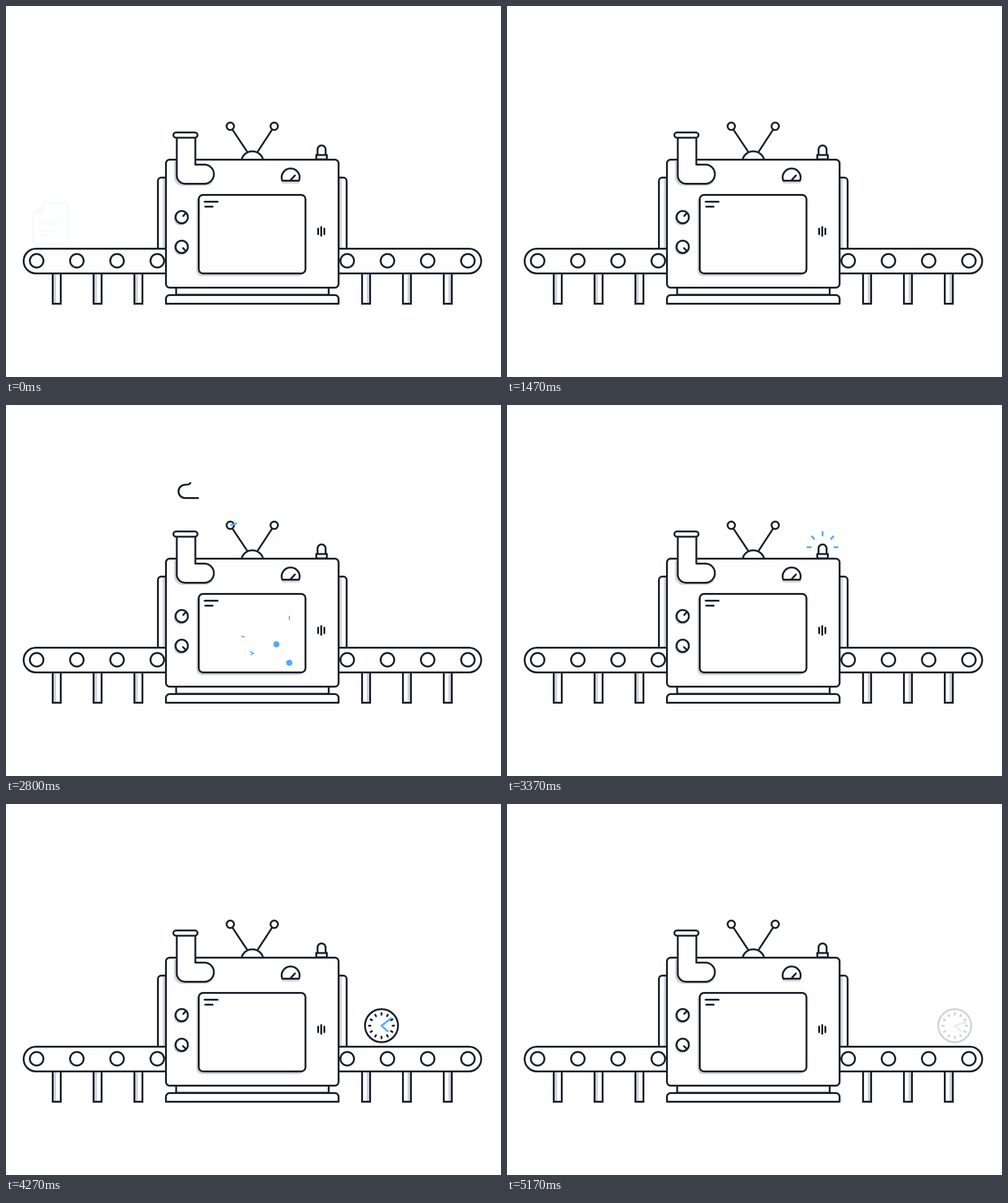
These frames come from a looping animation (800 by 600 pixels, 5.2 s). An HTML page:

```html
<!DOCTYPE html>
<html lang="en">
<head>
<meta charset="utf-8">
<title>Code machine</title>
<style>
html, body { margin: 0; width: 100%; height: 100%; overflow: hidden; background: #fff; }
svg { display: block; width: 800px; height: 600px; }
.ink { fill: #fff; stroke: #16222d; stroke-width: 3; stroke-linejoin: round; stroke-linecap: round; }
.line { fill: none; }
.shade { fill: #d2d3d7; }
.blue { fill: none; stroke: #54aaff; stroke-width: 3; stroke-linecap: round; stroke-linejoin: round; }
.solid { fill: #54aaff; stroke: none; }
#label { font: bold 14.5px "Open Sans", sans-serif; }
</style>
</head>
<body>
<svg viewBox="0 0 800 600">
  <g class="ink">
    <g id="legs"></g>
    <path d="M258 392.5H48.5a20 20 0 0 0 0 40H258"/>
    <path d="M538 392.5H748a20 20 0 0 1 0 40H538"/>
    <g id="rollers"></g>
  </g>

  <g id="doc" class="blue">
    <path fill="#fff" d="M-10 318.5H24.500a4 4 0 0 1 4 4V381a4 4 0 0 1-4 4H-24a4 4 0 0 1-4-4V336Z"/>
    <path class="solid" d="M-29 336.500L-10 317.500V332a4.500 4.500 0 0 1-4.500 4.500Z"/>
    <text id="label" class="solid" x="-18" y="357">!?#$*</text>
    <path d="M-13.500 364.500H9M-13.500 370.500H-2"/>
  </g>

  <g id="clock">
    <circle class="ink" cy="358.500" r="26.700"/>
    <path id="ticks" class="ink line"/>
    <path id="hands" class="blue"/>
  </g>

  <g class="ink">
    <path d="M258 277.500H251a5.500 5.500 0 0 0-5.500 5.500V392"/>
    <path d="M538 277.500H545a5.500 5.500 0 0 1 5.500 5.500V392"/>
    <path class="shade" stroke="none" d="M253.500 279h4v112h-4zM538.500 279h4v112h-4z"/>
    <path d="M275 455.500H521.500V467H275Z"/>
    <path d="M258.500 481.500V473.500a6 6 0 0 1 6-6H531.500a6 6 0 0 1 6 6V481.500Z"/>
    <path d="M381 248C383 240 390 235 398 235S413 240 415.500 248M366 200L390 236M430 200L406.500 236"/>
    <circle cx="362.500" cy="194.500" r="6"/>
    <circle cx="433.500" cy="194.500" r="6"/>
    <path d="M503.500 241V232a6.500 6.500 0 0 1 13 0V241"/>
    <path stroke-linejoin="miter" d="M501.500 241H518.500V248H501.500Z"/>
    <rect x="258.500" y="248.500" width="279" height="207" rx="6"/>
    <g class="shade" stroke="none">
      <path d="M271.500 250V277a14 14 0 0 0 14 14H321a18 18 0 0 0 14-7Z"/>
      <rect x="307.500" y="307" width="174" height="130" rx="9"/>
      <circle cx="282" cy="344" r="11"/>
      <circle cx="282" cy="392" r="11"/>
      <path d="M446 282h28v5h-28z"/>
    </g>
    <path d="M276 213V274a13.500 13.500 0 0 0 13.500 13.500H320.500a15.500 15.500 0 0 0 0-31H306V213"/>
    <rect x="270.500" y="204.500" width="39" height="8.500" rx="4.250"/>
    <path d="M446.500 282.500H473.500A14.500 14.500 0 1 0 446.500 282.500Z"/>
    <path d="M460.500 281L467 274"/>
    <circle cx="284" cy="341.500" r="10"/>
    <circle cx="284" cy="389.500" r="10"/>
    <path d="M286.500 339.500L290 335.500M286 391.500L290 395.500"/>
    <rect x="311.500" y="305.500" width="172.500" height="127" rx="7"/>
    <path d="M321 316.500H342M322 324.500H334"/>
    <path d="M504.500 360V369M509.500 357.500V371.500M514.500 360V369"/>
  </g>

  <g id="network" class="blue" stroke-width="1.500"></g>
  <path id="spark" class="blue" d="M364 194L378 190L387 199L398 188L409 199L418 190L432 194"/>
  <path id="cloud" class="ink line" d="M298 126C297 128.500 294 129 289.500 129a10.750 10.750 0 0 0 0 21.500H322a9.500 9.500 0 0 0 0-19C323 123 317 118.500 310 118.500C304 118.500 299.500 122 298 126"/>
  <g id="rays" class="blue"></g>
</svg>
<script>
const LOOP = 5200;
const $ = id => document.getElementById(id);
const clamp = v => Math.max(0, Math.min(1, v));
const span = (t, from, to) => clamp((t - from) / (to - from));
const polar = (r, deg, x = 0, y = 358.5) => {
  const a = deg * Math.PI / 180;
  return `${x + r * Math.sin(a)} ${y - r * Math.cos(a)}`;
};

function add(parent, tag, attrs) {
  const el = document.createElementNS('http://www.w3.org/2000/svg', tag);
  for (const key in attrs) el.setAttribute(key, attrs[key]);
  return $(parent).appendChild(el);
}

// Piecewise linear position through [time, value] stops, continued at both ends.
function along(stops, t) {
  let i = 1;
  while (i < stops.length - 1 && t > stops[i][0]) i++;
  const [t0, v0] = stops[i - 1], [t1, v1] = stops[i];
  return v0 + (v1 - v0) * (t - t0) / (t1 - t0);
}

// Shows only the stretch of a path between two fractions of its length.
function trim(path, tail, head) {
  const length = path.getTotalLength();
  const shown = (head - tail) * length;
  path.style.display = shown > 0.01 ? '' : 'none';
  path.style.strokeDasharray = `${shown} ${length * 2}`;
  path.style.strokeDashoffset = -tail * length;
}

// Draws a path in the first half of each cycle and wipes it in the second.
function sweep(path, t, start, period, count) {
  const cycle = (t - start) / period;
  const phase = cycle < 0 || cycle >= count ? 0 : cycle % 1 * 2;
  trim(path, clamp(phase - 1), clamp(phase));
}

for (const side of [0, 1]) {
  for (let i = 0; i < 4; i++)
    add('rollers', 'circle', { cx: 49.5 + side * 502 + i * 65, cy: 412, r: 11 });
  for (let i = 0; i < 3; i++) {
    const x = 75.5 + side * 500 + i * 66;
    add('legs', 'rect', { x, y: 432, width: 13, height: 49.5, 'stroke-linejoin': 'miter', style: 'stroke-linejoin:miter' });
    add('legs', 'rect', { x: x + (side ? 7.5 : 1.5), y: 434, width: 4, height: 46, class: 'shade', style: 'stroke:none' });
  }
}

$('ticks').setAttribute('d', Array.from({ length: 12 }, (_, i) =>
  `M${polar(17.8, i * 30)}L${polar(20.3, i * 30)}`).join(''));

const rays = [-90, -45, 0, 45, 90].map(deg =>
  add('rays', 'path', { d: `M${polar(16, deg, 510, 230)}L${polar(24.5, deg, 510, 230)}` }));

// Nodes: x, y, appearing time, vanishing time.
const nodes = [
  [340, 365, 1640, 2600], [350, 419.5, 1720, 2630], [385, 375, 1820, 2680],
  [400, 402, 1900, 2720], [437, 387, 2020, 2860], [458, 417, 2250, 2890]
];
const wires = [[0, 2], [1, 3], [0, 3], [2, 4], [3, 5], [4, 5]].map(([a, b]) => {
  const [x1, y1, start] = nodes[a], [x2, y2, end] = nodes[b];
  return { start, end, path: add('network', 'path', { d: `M${x1} ${y1}L${x2} ${y2}`, style: 'stroke-width:1.8' }) };
});
wires.push({ start: 2300, end: 2500, path: add('network', 'path',
  { d: 'M458 417V341', style: 'stroke-width:1.8;stroke-linecap:butt' }) });
const dots = nodes.map(([cx, cy, start, stop]) =>
  ({ start, stop, el: add('network', 'circle', { cx, cy, class: 'solid' }) }));

const docStops = [[540, 122], [750, 158.5], [1080, 210], [1470, 275]];
const clockStops = [[3760, 542.5], [3910, 562], [4300, 610.5], [4630, 648.5], [4840, 676.5], [5170, 723.5]];

function place(id, x, opacity) {
  $(id).setAttribute('transform', `translate(${x} 0)`);
  $(id).style.opacity = opacity;
}

function render(t) {
  const docX = t < 540 ? 71 + 51 * (t / 540) ** 1.75 : along(docStops, t);
  place('doc', docX + 0.5, t < 1470 ? span(t, -15, 285) : 0);

  const clockX = along(clockStops, t);
  place('clock', clockX, t > 3500 ? 1 - span(t, 5050, 5200) : 0);
  $('hands').setAttribute('d',
    `M${polar(13.5, 132)}L0 358.5L${polar(19.5, 188 + 3.26 * (clockX - 648.5))}`);

  sweep($('cloud'), t, 1918, 720, 2);
  sweep($('spark'), t, 2780, 420, 1);
  for (const ray of rays) sweep(ray, t, 3100, 390, 2);

  for (const { start, end, path } of wires)
    trim(path, 0.91 * span(t, 2500, 2800) + 0.09 * span(t, 2800, 2840), span(t, start, end));
  for (const { start, stop, el } of dots)
    el.setAttribute('r', 5 * span(t, start, start + 90) * (1 - span(t, stop - 60, stop)));
}

function frame() {
  render(performance.now() % LOOP);
  requestAnimationFrame(frame);
}
frame();
</script>
</body>
</html>
```
